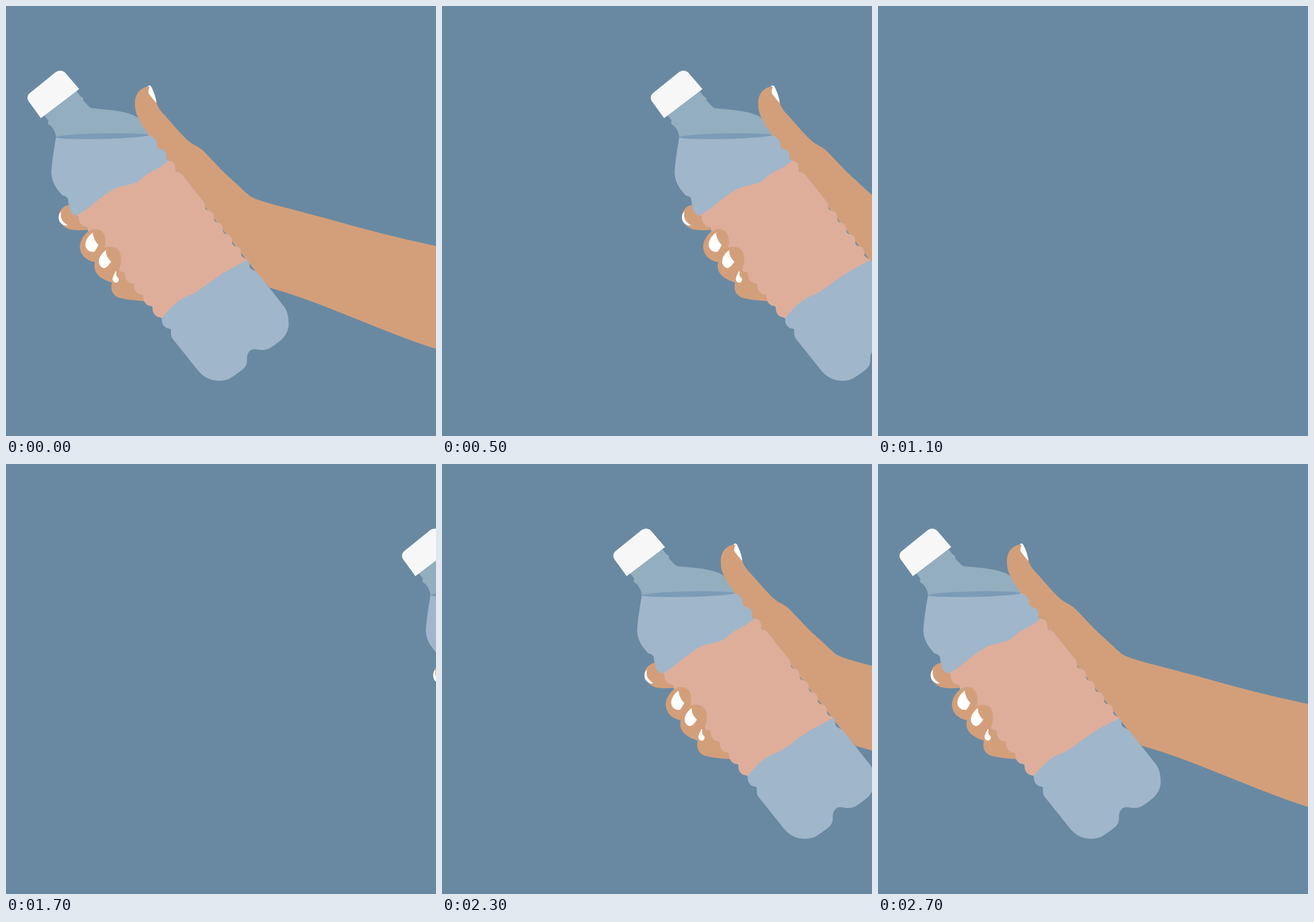
Write an HTML page that moves like this. It is 740 by 740 pixels and loops after 3.1 s.

```html
<!DOCTYPE html>
<html>
<head>
<meta charset="utf-8">
<style>
html, body { margin: 0; height: 100%; overflow: hidden; background: #6989a2; }
svg { display: block; width: 100vw; height: 100vh; }
</style>
</head>
<body>
<svg viewBox="0 0 740 740">
  <clipPath id="clip"><path class="bottle"/></clipPath>
  <g id="scene">
    <!-- neck -->
    <path fill="#92aebf" d="M64 186L73 197Q70 204 77 206C83 213 86 220 86 227L246 223C242 205 236 198 228 193C214 182 185 179 148 176C142 174 138 167 133 163Q134 157 129 156L119 144Z"/>
    <path fill="#f7f7f7" d="M60 193L39 164C36 160 36 153 42 149L84 115C90 110 97 110 102 115L126 143Z"/>
    <!-- arm, thumb, first and last finger -->
    <g fill="#d39f7a">
      <path d="M246 138C230 141 221 152 222 170C222 185 229 195 233 203C239 212 243 216 246 224L440 470L454 485C540 508 650 562 740 590V413C640 392 570 370 530 360C480 346 440 338 421 328C412 321 395 304 380 291C365 277 350 259 337 247C328 240 322 239 315 233C305 225 290 207 275 190C268 183 262 176 259 167Z"/>
      <path d="M109 342C98 344 91 352 91 362C91 372 98 379 106 383C116 387 130 386 146 385L160 380L125 345Z"/>
      <path d="M183 474C178 488 184 500 198 503C212 506 225 507 239 508L250 500L200 445Z"/>
    </g>
    <path class="bottle" fill="#a0b6ca"/>
    <ellipse cx="165.5" cy="224" rx="80" ry="4.7" fill="#7b9bb6" transform="rotate(-1.3 165.5 224)"/>
    <path fill="#deae9b" clip-path="url(#clip)" d="M90 380L124 359C145 348 165 325 188 314C200 308 215 309 227 302C235 297 240 290 250 285C262 280 270 274 280 266L320 240L450 418L416 437C395 448 378 456 363 467C350 475 335 489 320 496C295 506 290 512 268 537L230 575Z"/>
    <!-- middle fingers -->
    <path fill="#d39f7a" d="M145 386C135 391 128 402 127 414C128 428 137 438 153 441C150 452 155 464 168 470C174 474 182 475 183 477L194 455C198 445 200 432 195 422C190 413 176 413 169 416C172 410 172 404 170 396C167 385 155 381 145 386Z"/>
    <g fill="#fff">
      <path d="M244 138Q248 135 250 139C254 147 258 156 259 167C255 163 249 155 245 150Q245 143 247 140Z"/>
      <path d="M95 354C89 358 90 368 93 372C97 377 102 379 106 377C98 373 92 365 95 354Z"/>
      <path d="M149 390C141 396 135 406 137 414C139 421 146 424 152 423C155 419 158 414 159 411C154 406 151 401 149 390Z"/>
      <path d="M172 420C164 426 159 434 160 442C162 449 166 451 170 451C175 449 178 444 181 440C174 433 172 428 172 420Z"/>
      <path d="M189 456C186 462 182 468 184 473C187 477 191 477 193 474C196 470 193 468 191 466C189 462 190 460 190 457Z"/>
    </g>
  </g>
</svg>
<script>
// One ridge of the bottle: down the right side, up the left side
const right = 'c1 6 5 6 9 7c6 3 7 8 6.6 13.3';
const left = 'c.1-2.5-1.9-2.5-6.9-3.5c-6-3-9-8-9-16';

const outline = 'M245 222C252 224 260 229 260 240' + right.repeat(2) +
  'C292 285 294 286 297 286Q301 288 304 292L339 336Q343 341 342 346' + right.repeat(4) +
  'C405 433 412 434 416 437C420 441 418 448 421 452C425 455 430 455 435 462L476 514' +
  'C482 521 485 528 486 539C487 550 487 559 477 571C474 575 463 583 457 587' +
  'C450 592 442 593 432 591C424 589 418 592 415 602C414 608 416 614 412 620' +
  'C410 624 404 628 397 633C388 640 380 645 367 645C356 645 343 642 331 628' +
  'L287 573Q283 568 284 558' + left.repeat(11) +
  'Q107 340 107 336C108 331 104 327 97 326C87 314 79 305 78 287C79 268 82 250 86 226Z';
for (const path of document.querySelectorAll('.bottle')) path.setAttribute('d', outline);

const scene = document.getElementById('scene');
const start = performance.now();

// Slides out to the right, waits off stage, slides back; ten steps a second
function draw() {
  const step = Math.floor((performance.now() - start) % 3100 / 100);
  const shift = 64.45 * Math.max(0, Math.min(step, 11, 27 - step));
  scene.setAttribute('transform', `translate(${shift})`);
  requestAnimationFrame(draw);
}
draw();
</script>
</body>
</html>
```
